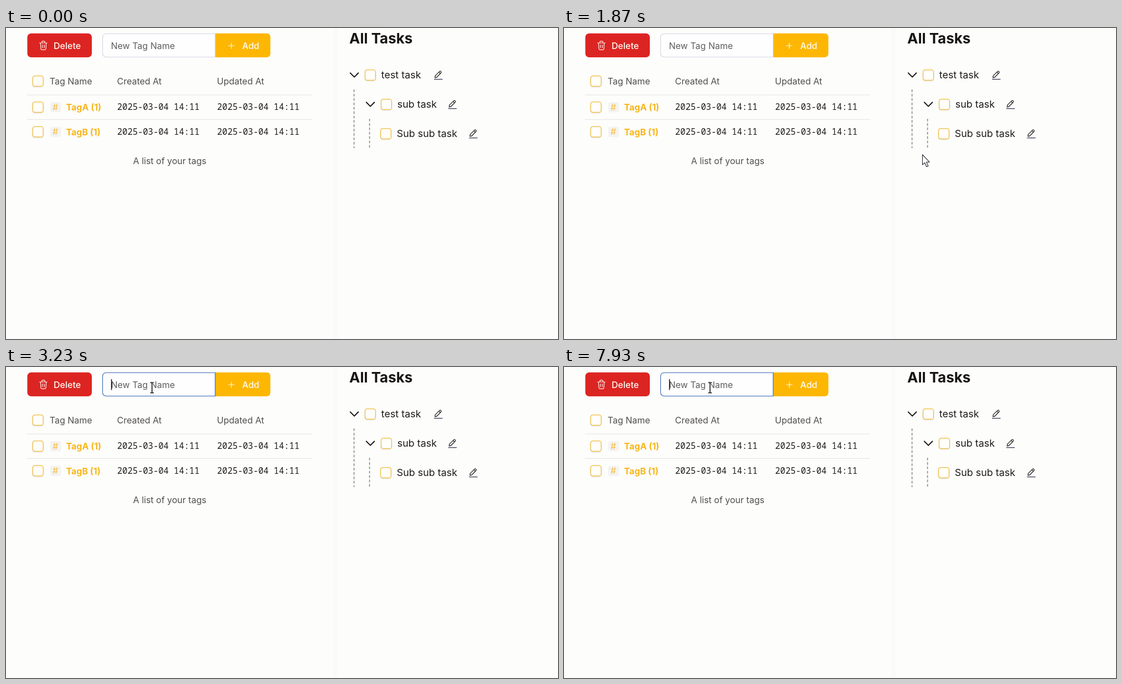
An HTML page for the animation above (8000 ms loop, 997 by 562 pixels).

```html
<!DOCTYPE html>
<html lang="en">
<head>
<meta charset="utf-8">
<title>Tags and tasks</title>
<style>
  html, body { margin: 0; width: 100%; height: 100%; overflow: hidden; background: #fdfdfb; }
  svg { display: block; }
  text { font: 16px Inter, "Open Sans", sans-serif; white-space: pre; fill: #504e4f; }
  .bold { font-weight: 700; fill: #f8b61c; }
  .title { font-weight: 700; font-size: 26px; fill: #171412; }
  .task { font-size: 17.9px; fill: #1f1c1b; }
  .mono { font: 15.5px "Noto Sans Mono", "DejaVu Sans Mono", monospace; fill: #1f1c1b; }
  .button { font-weight: 500; fill: #fffaf2; }
  .line { fill: none; stroke-linecap: round; stroke-linejoin: round; }
  .box { fill: #fffefb; stroke: #f2bc3a; stroke-width: 1.2; filter: drop-shadow(0 1px 1px #0002); }
  .dash { stroke: #8d8b8b; stroke-width: 1.6; stroke-dasharray: 4.8 3.1; }
</style>
</head>
<body>
<svg width="997" height="562" viewBox="0 0 997 562">
  <defs>
    <g id="check"><rect class="box" x=".6" y=".6" width="18.8" height="18.8" rx="4"/></g>
    <path id="chevron" class="line" d="M0 0L7.3 7.3L14.6 0" stroke="#1c1917" stroke-width="2"/>
    <g id="pencil" class="line" stroke="#292524" stroke-width="1.3">
      <path d="M1.2 12.6L1.6 9.2L9.6 1.2Q10.8 .2 12 1.4Q13.2 2.6 12.2 3.8L4.4 11.8ZM8.3 2.6L10.9 5.2"/>
      <path d="M0 15.4H14.4" stroke="#36304c"/>
    </g>
  </defs>

  <rect x="591" width="8" height="562" fill="#fafafa"/>

  <rect x="38.5" y="9.7" width="116.5" height="43.3" rx="7" fill="#dc2522"/>
  <path class="line" d="M60.7 27H74.3M64.8 26.5V25Q64.8 23.8 66 23.8H69Q70.2 23.8 70.2 25V26.5M62.3 27.3L63 37.7Q63.1 39.3 64.7 39.3H70.3Q71.9 39.3 72 37.7L72.7 27.3M65.8 30.5V35.7M69.2 30.5V35.7" stroke="#fff2ee" stroke-width="1.2"/>
  <text class="button" x="86" y="37.6">Delete</text>

  <path d="M378 9.7H470.5Q477.5 9.7 477.5 16.7V46Q477.5 53 470.5 53H378Z" fill="#fdb703"/>
  <path class="line" d="M402 32H412M407 27V37" stroke="#fffaf0" stroke-width="1.2"/>
  <text class="button" x="426.5" y="37.6">Add</text>

  <path id="field" d="M377.8 10.2H181.5Q174.5 10.2 174.5 17.2V45.5Q174.5 52.5 181.5 52.5H377.8Z" fill="#fefefe" stroke-width="1.1"/>
  <text id="entry" x="189.5" y="37.6"></text>
  <rect id="caret" y="22" width="1.5" height="19.5" fill="#111"/>

  <g id="table"></g>
  <path d="M38 121H553M38 165.3H553" stroke="#e3e2e0"/>
  <text x="229.6" y="246.4">A list of your tags</text>

  <text class="title" x="620" y="28.4">All Tasks</text>
  <path class="dash" d="M628.6 111V217M656.6 164V217"/>
  <g id="tree"></g>

  <g id="pointer">
    <path id="arrow" d="M.5 .8V19.2L4.6 15.5L7.8 22.8L10.8 21.5L7.6 14.3H13.2Z" fill="#fff" stroke="#22222c" stroke-width="1.1" stroke-linejoin="round"/>
    <g id="beam" fill="none">
      <path d="M-3.5 -9H3.5M-3.5 9.5H3.5M0 -9V9.5" stroke="#fff" stroke-width="3.4"/>
      <path d="M-3.2 -9H-1L0 -8.2L1 -9H3.2M-3.2 9.5H-1L0 8.7L1 9.5H3.2M0 -8.2V8.7" stroke="#111" stroke-width="1.6"/>
    </g>
  </g>
</svg>
<script>
const LOOP = 8000;
const $ = id => document.getElementById(id);
const use = (id, x, y) => `<use href="#${id}" x="${x}" y="${y}"/>`;
const label = (text, x, y, cls = "") => `<text class="${cls}" x="${x}" y="${y}">${text}</text>`;

const tagRow = (name, y) =>
  use("check", 47.7, y - 10) +
  `<rect x="80" y="${y - 9}" width="19.5" height="18.5" rx="4" fill="#f4f3f3"/>` +
  label("#", 84, y + 5.8).replace("<text", '<text style="fill:#f7bd42"') +
  label(name, 108.5, y + 6, "bold") +
  [200.8, 381.3].map(x => label("2025-03-04 14:11", x, y + 5.3, "mono")).join("");

$("table").innerHTML =
  use("check", 47.7, 86) +
  label("Tag Name", 78.8, 102.2) + label("Created At", 200.5, 102.2) + label("Updated At", 381, 102.2) +
  tagRow("TagA (1)", 143) + tagRow("TagB (1)", 187.5);

const taskRow = (name, y, box, edit, fold) =>
  (fold ? use("chevron", fold, y - 3.7) : "") +
  use("check", box, y - 10) + label(name, box + 29.8, y + 6.4, "task") + use("pencil", edit, y - 7.8);

$("tree").innerHTML =
  taskRow("test task", 85, 648, 773.6, 621.8) +
  taskRow("sub task", 138, 677, 799.2, 650.8) +
  taskRow("Sub sub task", 191, 676, 836.8);

// [start, text, caret shown]
const typing = [
  [0, "", 0], [3030, "", 1], [3600, "", 0], [4070, "T", 1], [4470, "Ta", 1], [4870, "Tag", 1],
  [5400, "Tag", 0], [5770, "TagC", 1], [6370, "TagC", 0], [6900, "TagC", 1], [7400, "TagC", 0],
  [7570, "", 0], [7930, "", 1]
];

const inOut = p => (1 - Math.cos(Math.PI * p)) / 2;
const out = p => 1 - (1 - p) ** 3;
// [tick, x, y, easing into this point], 30 ticks a second
const path = [
  [42, 970, 521], [56, 647, 228, out], [61, 647, 228, inOut],
  [68, 335, 73, inOut], [80, 263.7, 37.3, out]
];

const mix = (a, b, p) => a + (b - a) * p;
const clamp = p => Math.min(1, Math.max(0, p));

function pointerAt(tick) {
  const i = path.findIndex(k => k[0] > tick);
  if (i < 0) return path[path.length - 1].slice(1, 3);
  if (i === 0) return null;
  const a = path[i - 1], b = path[i];
  const p = b[3]((tick - a[0]) / (b[0] - a[0]));
  return [mix(a[1], b[1], p), mix(a[2], b[2], p)];
}

function draw(t) {
  const [, text, shown] = typing.filter(k => k[0] <= t).pop();
  const entry = $("entry");
  entry.textContent = text || "New Tag Name";
  entry.style.fill = text ? "#2a2827" : "#605e5f";
  $("caret").setAttribute("x", text ? 189.3 + entry.getComputedTextLength() : 189.8);
  $("caret").style.opacity = shown;

  const focus = clamp((t - 3030) / 200);
  const rgb = [[212, 211, 228], [52, 101, 184]];
  $("field").setAttribute("stroke", `rgb(${rgb[0].map((c, i) => Math.round(mix(c, rgb[1][i], focus)))})`);

  const at = pointerAt(Math.floor(t * 0.03 + 0.11));
  $("pointer").style.display = at ? "" : "none";
  if (at) {
    const [x, y] = at;
    const overField = x > 174 && x < 378 && y < 53;
    $("pointer").setAttribute("transform", `translate(${x} ${y})`);
    $("arrow").style.display = overField ? "none" : "";
    $("beam").style.display = overField ? "" : "none";
  }
}

const start = performance.now();
function frame() {
  draw((performance.now() - start) % LOOP);
  requestAnimationFrame(frame);
}
frame();
</script>
</body>
</html>
```
